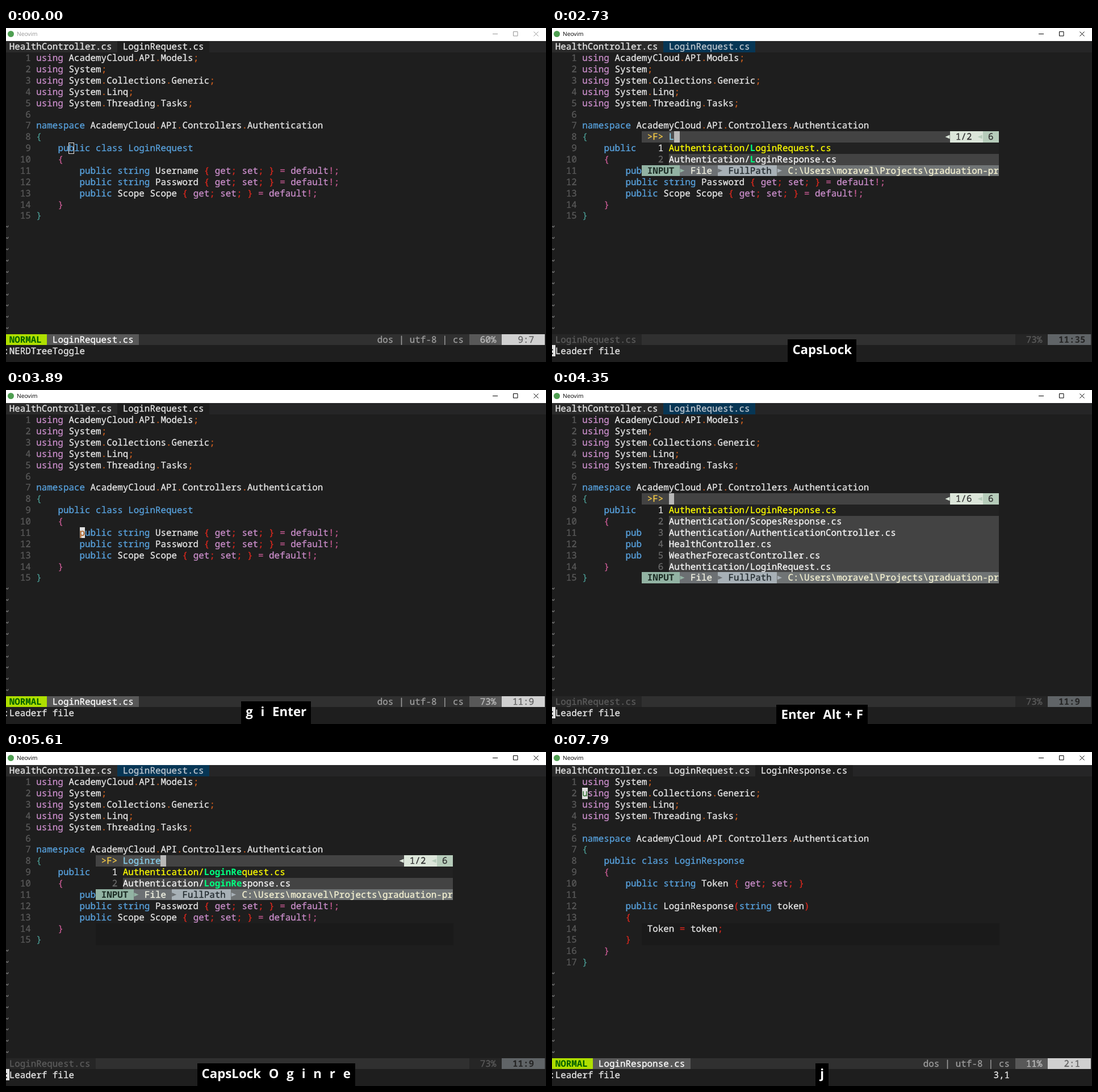
Write an HTML page that moves like this. It is 951 px wide and 589 px high and loops after 8 s.

```html
<!DOCTYPE html>
<html lang="en">
<head>
<meta charset="utf-8">
<title>Editor file finder</title>
<style>
html, body { margin: 0; width: 100%; height: 100%; overflow: hidden; background: #1e1e1e; }
svg { display: block; width: 100vw; height: 100vh; }
text { white-space: pre; text-rendering: geometricPrecision; }
rect { shape-rendering: crispEdges; }
.mono { font: 15.88px "Noto Sans Mono", "DejaVu Sans Mono", monospace; stroke-width: .3px; }
.bold { font-weight: 700; stroke-width: 0; }
.title { font: 10.2px "Open Sans", "Noto Sans", sans-serif; }
.keys { font: 700 22.3px "Open Sans", "Noto Sans", sans-serif; word-spacing: 1.1px; fill: #fff; }
.cursor { fill: #fff; mix-blend-mode: difference; }
</style>
</head>
<body>
<svg id="stage" viewBox="0 0 951 589"><g id="screen"></g><g id="overlay"></g></svg>
<script>
const LOOP = 8000, KEY_LIFE = 930;
const BG = '#1e1e1e', FG = '#e8e8e8', PANEL = '#434343';
const BLUE = '#58a2de', PINK = '#cb8ecb';
const LEVELS = ['#d0601f', '#4a9a92', '#c65a92', '#d8281e'];
const STATUS_ROW = 26, COMMAND_ROW = 27, POPUP_ROW = 8;
const POPUP_LEFT = 17, POPUP_RIGHT = 83;

const REQUEST = `using AcademyCloud.API.Models;
using System;
using System.Collections.Generic;
using System.Linq;
using System.Threading.Tasks;

namespace AcademyCloud.API.Controllers.Authentication
{
    public class LoginRequest
    {
        public string Username { get; set; } = default!;
        public string Password { get; set; } = default!;
        public Scope Scope { get; set; } = default!;
    }
}`;
const RESPONSE = `using System;
using System.Collections.Generic;
using System.Linq;
using System.Threading.Tasks;

namespace AcademyCloud.API.Controllers.Authentication
{
    public class LoginResponse
    {
        public string Token { get; set; }

        public LoginResponse(string token)
        {
            Token = token;
        }
    }
}`;

const LOGIN_REQUEST = 'Authentication/LoginRequest.cs';
const LOGIN_RESPONSE = 'Authentication/LoginResponse.cs';
const ALL_FILES = [LOGIN_RESPONSE, 'Authentication/ScopesResponse.cs',
  'Authentication/AuthenticationController.cs', 'HealthController.cs',
  'WeatherForecastController.cs', LOGIN_REQUEST];

const KEYS = [[850, 'Alt + F'], [2580, 'CapsLock'], [2740, 'CapsLock'], [2900, 'O'], [3130, 'g'],
  [3200, 'i'], [3500, 'Enter'], [4110, 'Alt + F'], [4580, 'CapsLock'], [4740, 'CapsLock'],
  [4820, 'O'], [4900, 'g'], [4970, 'i'], [5050, 'n'], [5280, 'r'], [5600, 'e'], [5920, 's'],
  [6130, 'Tab'], [6860, 'Enter'], [7560, 'j']];
const SEARCHES = [
  { open: 930, close: 3580, text: 'Logi', times: [2660, 2900, 3130, 3200] },
  { open: 4190, close: 6930, text: 'Loginres', times: [4660, 4820, 4900, 4970, 5050, 5280, 5600, 5920], tab: 6130 }
];

const colX = c => -3.9 + 9.53 * c;
const rowY = r => 23 + 19.87 * r;
const esc = s => s.replace(/&/g, '&amp;').replace(/</g, '&lt;').replace(/>/g, '&gt;');
const box = (x, y, w, h, fill) => `<rect x="${x}" y="${y}" width="${w}" height="${h}" fill="${fill}"/>`;

function cells(from, to, row, fill) {
  const x = Math.round(colX(from)), y = Math.round(rowY(row));
  return box(x, y, Math.round(colX(to)) - x, Math.round(rowY(row + 1)) - y, fill);
}

function put(col, row, str, fill = FG, bold = false) {
  return `<text class="mono${bold ? ' bold' : ''}" x="${colX(col).toFixed(2)}" ` +
    `y="${(rowY(row) + 15.4).toFixed(2)}" fill="${fill}" stroke="${fill}">${esc(str)}</text>`;
}

function block(col, row) {
  return cells(col, col + 1, row, '#fff').replace('<rect', '<rect class="cursor"');
}

function arrow(col, row, dir, fill) {
  const x = colX(col) + (dir < 0 ? 8.7 : 0.7), y = rowY(row) + 10;
  return `<path d="M${x} ${y - 3.5}l${dir * 8} 3.5l${-dir * 8} 3.5z" fill="${fill}"/>`;
}

function code(source) {
  let out = '', depth = 0, afterClass = false;
  const lines = source.split('\n');
  lines.forEach((line, i) => {
    const row = i + 1;
    out += put(2, row, String(row).padStart(3), '#5a5a5a');
    for (const { 0: token, index } of line.matchAll(/[A-Za-z]+|\S/g)) {
      let fill = FG;
      if (/\w/.test(token)) {
        if (/^(using|get|set|default)$/.test(token)) fill = PINK;
        else if (afterClass || /^(public|class|string|namespace)$/.test(token)) fill = BLUE;
        afterClass = token === 'class';
      } else {
        if ('{('.includes(token)) depth++;
        fill = LEVELS[depth];
        if ('})'.includes(token)) depth--;
      }
      out += put(6 + index, row, token, fill);
    }
  });
  for (let row = lines.length + 1; row < STATUS_ROW; row++) out += put(0, row, '~', '#858585');
  return out;
}

function tabs(names, active, finding) {
  let out = cells(0, 101, 0, '#252526'), col = 0;
  names.forEach((name, i) => {
    const end = col + name.length + 2, current = i === active;
    out += cells(col, end, 0, !current ? '#2a2a2a' : finding ? '#073655' : BG);
    out += put(col + 1, 0, name, current && finding ? '#c0c8d0' : FG);
    col = end;
  });
  return out;
}

function statusLine(file, percent, line, column, finding) {
  const place = String(line).padStart(3) + ':' + column;
  const share = percent.padStart(4);
  if (finding) {
    return cells(0, 101, STATUS_ROW, '#262626') + cells(17, 86, STATUS_ROW, '#303030') +
      cells(92, 100, STATUS_ROW, '#606467') + put(1, STATUS_ROW, file, '#5c5c5c') +
      put(87, STATUS_ROW, share, '#5c5c5c') + put(93, STATUS_ROW, place, '#262626', true);
  }
  return cells(0, 100, STATUS_ROW, '#303030') + cells(0, 8, STATUS_ROW, '#afdf00') +
    put(1, STATUS_ROW, 'NORMAL', '#005f00', true) +
    cells(8, 10 + file.length, STATUS_ROW, '#585858') + put(9, STATUS_ROW, file, '#fff') +
    put(69, STATUS_ROW, 'dos | utf-8 | cs', '#9e9e9e') +
    cells(86, 92, STATUS_ROW, '#585858') + put(87, STATUS_ROW, share, '#bcbcbc') +
    cells(92, 100, STATUS_ROW, '#d0d0d0') + put(93, STATUS_ROW, place, '#606060');
}

// Draws a path with the letters that match the query in green.
function match(row, path, query, fill) {
  if (!query) return put(22, row, path, fill);
  const hits = new Set();
  let from = path.indexOf('/') + 1;
  for (const letter of query.toLowerCase()) {
    const at = path.toLowerCase().indexOf(letter, from);
    hits.add(at);
    from = at + 1;
  }
  return [...path].map((ch, i) =>
    put(22 + i, row, ch, hits.has(i) ? '#00ff7f' : fill, hits.has(i))).join('');
}

function popup(query, normal, cursorOn) {
  const files = !query ? ALL_FILES :
    query === 'Loginres' ? [LOGIN_RESPONSE, LOGIN_REQUEST] : [LOGIN_REQUEST, LOGIN_RESPONSE];
  const help = normal ? ['" Press <F1> for help', '" ' + '-'.repeat(57)] : [];
  const selected = help.length, end = 22 + query.length;

  let out = cells(POPUP_LEFT, POPUP_RIGHT, POPUP_ROW, PANEL) + put(18, POPUP_ROW, '>F>', '#f0c645') +
    cells(22, end, POPUP_ROW, '#4e4e4e') + put(22, POPUP_ROW, query, '#87ceeb');
  if (!normal) out += cells(end, end + 1, POPUP_ROW, cursorOn ? '#b8b8b8' : '#505050');
  out += arrow(73, POPUP_ROW, -1, '#dce6da') + cells(74, 80, POPUP_ROW, '#dce6da') +
    put(75, POPUP_ROW, `${selected + 1}/${files.length}`, '#303030') +
    arrow(79, POPUP_ROW, -1, '#b6ccba') + cells(80, POPUP_RIGHT, POPUP_ROW, '#b6ccba') +
    put(81, POPUP_ROW, '6', '#303030');

  [...help, ...files].forEach((entry, i) => {
    const row = POPUP_ROW + 1 + i, current = i === selected;
    out += cells(POPUP_LEFT, 22, row, BG) + cells(22, POPUP_RIGHT, row, current ? '#222' : PANEL) +
      put(20, row, String(i + 1), current ? FG : '#6a6a6a');
    out += i < selected ? put(22, row, entry, '#608b4e') :
      match(row, entry, query, current ? '#ffff00' : '#f8f8f8');
    if (current && normal) out += block(22, row);
  });

  const row = POPUP_ROW + 1 + help.length + files.length;
  const mode = normal ? 'NORMAL' : 'INPUT', modeFill = normal ? '#c5cc8e' : '#92b3a3';
  const a = POPUP_LEFT + mode.length + 2, b = a + 7, c = b + 11;
  const folder = 'C:\\Users\\moravel\\Projects\\graduation-project'.slice(0, POPUP_RIGHT - c - 2);
  return out + cells(POPUP_LEFT, a, row, modeFill) + put(18, row, mode, '#1c2c24', true) +
    cells(a, b, row, '#6c7073') + arrow(a, row, 1, modeFill) + put(a + 2, row, 'File', '#f4f4e4') +
    cells(b, c, row, '#a7b0b6') + arrow(b, row, 1, '#6c7073') + put(b + 2, row, 'FullPath', '#20282c') +
    cells(c, POPUP_RIGHT, row, '#707475') + arrow(c, row, 1, '#a7b0b6') + put(c + 2, row, folder, '#f6f3d3');
}

function titleBar(t) {
  const focus = Math.min(1, Math.max(0, Math.ceil((t - 69) / 80) / 4));
  const shade = Math.round(150 * (1 - focus)), ink = `rgb(${shade},${shade},${shade})`;
  return box(0, 0, 951, 23, '#fff') + '<circle cx="8.5" cy="10.5" r="5.5" fill="#4f9f52"/>' +
    `<text class="title" x="19" y="14.3" fill="${ink}">Neovim</text>` +
    `<path d="M857 10.5h9M893.5 6.5h7.5v7.5h-7.5zM929.5 6.5l8 8m0-8l-8 8" fill="none" stroke="${ink}"/>`;
}

function screen(t) {
  const search = SEARCHES.find(s => t >= s.open && t < s.close);
  const opened = t >= SEARCHES[1].close;
  const line = opened ? (t < 7560 ? 1 : 2) : t < 150 ? 9 : 11;
  const column = opened ? 1 : t < 150 ? 7 : t < SEARCHES[0].close ? 35 : 9;
  const percent = { 1: '5%', 2: '11%', 9: '60%', 11: '73%' }[line];
  const names = ['HealthController.cs', 'LoginRequest.cs'];
  if (opened) names.push('LoginResponse.cs');
  const active = names.length - 1;

  let out = box(0, 0, 951, 589, BG) + titleBar(t) + tabs(names, active, !!search);
  if (t >= 4660) out += box(158, 302, 630, 39, '#1a1a1a');
  out += code(opened ? RESPONSE : REQUEST) + statusLine(names[active], percent, line, column, !!search);
  out += put(0, COMMAND_ROW, t < 850 ? ':NERDTreeToggle' : ':Leaderf file');
  if (t >= SEARCHES[1].tab) out += put(82, COMMAND_ROW, '3,1');

  if (search) {
    const query = search.text.slice(0, search.times.filter(at => t >= at).length);
    const normal = t >= search.tab;
    const blinkedOff = (t >= 1480 && t < 1950) || (t >= 2480 && t < 2660);
    out += popup(query, normal, !blinkedOff);
    out += normal ? put(96, COMMAND_ROW, 'All') : block(0, COMMAND_ROW);
  } else if (t < 70) {
    out += `<rect x="${Math.round(colX(12)) + .5}" y="202.5" width="9" height="19" fill="none" stroke="#e8e8e8"/>`;
  } else {
    out += block(5 + column, line);
  }
  return out;
}

const screenLayer = document.getElementById('screen');
const overlayLayer = document.getElementById('overlay');
const shown = new Map();

function update(layer, markup) {
  if (shown.get(layer) === markup) return false;
  shown.set(layer, markup);
  layer.innerHTML = markup;
  return true;
}

function drawKeys(t) {
  const label = KEYS.filter(([at]) => t >= at && t < at + KEY_LIFE).map(k => k[1]).join('  ');
  const low = /[gpj]/.test(label), top = low ? 549 : 555;
  const markup = label && box(0, top, 0, 589 - top, '#000') +
    `<text class="keys" x="475.7" y="${low ? 574.7 : 580}" text-anchor="middle">${label}</text>`;
  if (!update(overlayLayer, markup) || !label) return;
  const [back, text] = overlayLayer.children;
  const width = text.getComputedTextLength() + 16;
  back.setAttribute('x', 475.7 - width / 2);
  back.setAttribute('width', width);
}

const start = performance.now();
function frame() {
  const t = (performance.now() - start) % LOOP;
  update(screenLayer, screen(t));
  drawKeys(t);
  requestAnimationFrame(frame);
}
frame();
</script>
</body>
</html>
```
